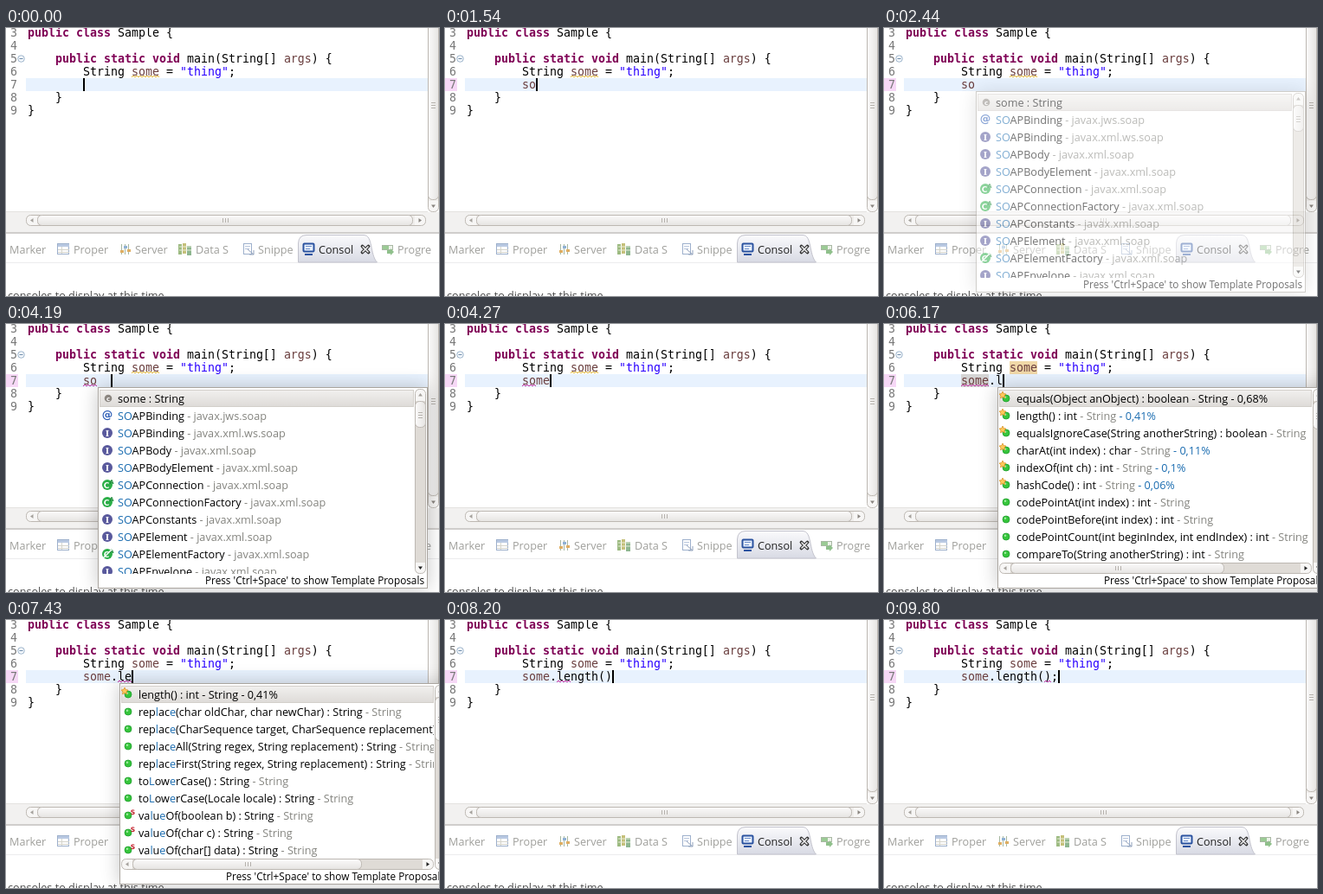
Recreate the animation shown at these times as an HTML page. Size 500 by 310 pixels, loop 9.9 s.

```html
<!DOCTYPE html>
<html lang="en">
<head>
<meta charset="utf-8">
<title>Code completion</title>
<style>
html, body { margin: 0; width: 100%; height: 100%; overflow: hidden; background: #fff; }
svg { display: block; }
#stage { position: absolute; left: 0; top: 0; }
text { white-space: pre; }
.code { font: 13.29px "DejaVu Sans Mono", monospace; fill: #000; }
.ui { font: 12.65px "Open Sans", "Noto Sans", sans-serif; fill: #000; }
.hint { font-size: 11.77px; }
.key { font-weight: bold; fill: #7f0055; }
.var { fill: #6a3e3e; }
.str { fill: #2a00ff; }
.num { fill: #787878; }
.hit { fill: #1a6cb0; }
.dim { fill: #84847f; }
.pick tspan { fill: #000; }
.tab { fill: #9f9f9b; }
.shade { filter: blur(11px); opacity: .22; }
</style>
</head>
<body>
<svg id="stage" width="500" height="310" viewBox="0 0 500 310"></svg>
<script>
const LOOP = 9900, CELL = 8, LEFT = 89;

const rect = (x, y, w, h, fill, more = '') =>
  `<rect x="${x}" y="${y}" width="${w}" height="${h}" fill="${fill}" ${more}/>`;
const path = (d, stroke, more = '') =>
  `<path d="${d}" fill="none" stroke="${stroke}" ${more}/>`;
const dot = (x, y, r, fill, more = '') =>
  `<circle cx="${x}" cy="${y}" r="${r}" fill="${fill}" ${more}/>`;
const text = (x, y, s, cls, more = '') =>
  `<text x="${x}" y="${y}" class="${cls}" ${more}>${s}</text>`;
const span = (cls, s) => `<tspan class="${cls}">${s}</tspan>`;
const group = (id, s, more = '') => `<g id="${id}" ${more}>${s}</g>`;
const clip = (x, y, w, h, s) =>
  `<svg x="${x}" y="${y}" width="${w}" height="${h}" viewBox="${x} ${y} ${w} ${h}">${s}</svg>`;
const gradient = (id, a, b, across = 0) =>
  `<linearGradient id="${id}" x2="${across}" y2="${1 - across}">
   <stop stop-color="${a}"/><stop offset="1" stop-color="${b}"/></linearGradient>`;

function squiggle(x, end, y, color) {
  let d = `M${x} ${y}`;
  for (let i = 1; x + 2 * i <= end; i++) d += `l2 ${i % 2 ? -2 : 2}`;
  return path(d, color);
}

// Scrollbar with arrow buttons; the thumb covers from..to along its axis.
function bar(x, y, w, h, from, to, trough = '#efedeb', ink = '#8a8580') {
  const tall = h > w, edge = 'stroke="#bdb8b2" rx="5"';
  const cx = x + w / 2, cy = y + h / 2, mid = Math.round((from + to) / 2);
  const size = tall ? h : w;
  const arrow = (along, turn, fill) => {
    const [px, py] = tall ? [cx, y + along] : [x + along, cy];
    return `<path d="M-2.5 -1.5h5L0 2z" fill="${fill}" transform="translate(${px} ${py}) rotate(${turn})"/>`;
  };
  let s = rect(x + .5, y + .5, w - 1, h - 1, '#f7f6f5', edge);
  s += tall ? rect(x + 1, from, w - 2, size - 13 - from + y, trough)
    : rect(from, y + 1, size - 13 - from + x, h - 2, trough);
  s += tall ? rect(x + .5, from + .5, w - 1, to - from - 1, 'url(#across)', edge)
    : rect(from + .5, y + .5, to - from - 1, h - 1, 'url(#down)', edge);
  s += arrow(7, tall ? 180 : 90, '#a5a19c') + arrow(size - 7, tall ? 0 : -90, ink);
  for (const k of [-3, 0, 3])
    s += tall ? rect(cx - 2.5, mid + k, 5, 1, '#b5b1ac') : rect(mid + k, cy - 2.5, 1, 5, '#b5b1ac');
  return s;
}
const popBar = (...box) => bar(...box, '#dfdbd6', '#222');

const letter = (x, y, s, size, fill, face = 'DejaVu Sans, sans-serif') =>
  `<text x="${x}" y="${y}" font-family="${face}" font-weight="bold" font-size="${size}" text-anchor="middle" fill="${fill}">${s}</text>`;
const green = (x, y) => dot(x, y, 4, '#35c53b', 'stroke="#1f9d2c" stroke-width=".8"') +
  dot(x - 1, y - 1.3, 1.3, '#9bea9c');
const icons = {
  l: (x, y) => dot(x, y, 4.3, '#8b8680') + letter(x, y + 2.5, 'c', 7, '#fff'),
  a: (x, y) => letter(x - 1, y + 3, '@', 12.5, '#2a5bb5'),
  i: (x, y) => dot(x - 1, y, 6, '#59599c') + letter(x - 1, y + 3.5, 'I', 9.5, '#fff', 'DejaVu Serif, serif'),
  c: (x, y) => dot(x - 1, y, 6, '#2bae47') + letter(x - 2, y + 3.5, 'C', 9, '#fff') +
    letter(x + 4, y - 1, 'A', 6.5, '#1d8a3a'),
  d: (x, y) => icons.c(x, y) + path(`M${x - 6} ${y + 5}L${x + 5} ${y - 6}`, '#fff', 'stroke-width="1.4"'),
  m: green,
  s: (x, y) => green(x, y) +
    `<path d="M${x - 4} ${y - 8}l1.2 2.6 2.8.4-2 2 .5 2.8-2.5-1.4-2.5 1.4.5-2.8-2-2 2.8-.4z" fill="#ffc95c" stroke="#d28a1c" stroke-width=".7"/>`,
  v: (x, y) => green(x, y) + letter(x + 5.5, y - 1, 'S', 7.5, '#c3202c'),
};

// Row syntax: icon key, then label with *match* and ~secondary parts.
function row(src, i, x, iconX) {
  const cy = 86 + 20 * i;
  const label = src.slice(1).split(/(\*[^*]*\*|~[^*]*)/).map(p =>
    p[0] === '*' ? span('hit', p.slice(1, -1)) : p[0] === '~' ? span('dim', p.slice(1)) : p).join('');
  return icons[src[0]](iconX, cy) + text(x, cy + 5, label, i ? 'ui' : 'ui pick');
}
function list(x, w, textX, iconX, rows) {
  return clip(x, 75, w, 214, rect(x, 75, w, 214, '#fff') +
    rect(x + .5, 76.5, w - 1, 19, 'url(#pick)', 'stroke="#d3cfca"') +
    rows.map((r, i) => row(r, i, textX, iconX)).join(''));
}
function frame(x, w) {
  return rect(x, 73, w, 233, '#000', 'class="shade"') +
    rect(x + .5, 73.5, w - 1, 232, '#fff', 'stroke="#aaa59f"');
}
const hint = x => text(x, 301, "Press 'Ctrl+Space' to show Template Proposals", 'ui hint');

const soap = (icon, name, pkg = 'xml') => `${icon}*SO*AP${name}~ - javax.${pkg}.soap`;
const types = ['lsome : String', soap('a', 'Binding', 'jws'), soap('i', 'Binding', 'xml.ws'),
  soap('i', 'Body'), soap('i', 'BodyElement'), soap('c', 'Connection'),
  soap('c', 'ConnectionFactory'), soap('i', 'Constants'), soap('i', 'Element'),
  soap('d', 'ElementFactory'), soap('i', 'Envelope')];

const from = (sig, pct) => sig + '~ - String' + (pct ? `* - ${pct}%*` : '');
const swaps = [
  from('mrep*l*ac*e*(char oldChar, char newChar) : String'),
  from('mrep*l*ac*e*(CharSequence target, CharSequence replacement) : String'),
  from('mrep*l*ac*e*All(String regex, String replacement) : String'),
  from('mrep*l*ac*e*First(String regex, String replacement) : String')];
const members = [
  [from('sequals(Object anObject) : boolean', '0,68'), from('slength() : int', '0,41'),
    from('sequalsIgnoreCase(String anotherString) : boolean'),
    from('scharAt(int index) : char', '0,11'), from('sindexOf(int ch) : int', '0,1'),
    from('shashCode() : int', '0,06'), from('mcodePointAt(int index) : int'),
    from('mcodePointBefore(int index) : int'),
    from('mcodePointCount(int beginIndex, int endIndex) : int'),
    from('mcompareTo(String anotherString) : int')],
  [from('slength() : int', '0,41'), from('sequa*l*s(Object anObject) : boolean', '0,68'),
    from('sequa*l*sIgnoreCase(String anotherString) : boolean'),
    from('m*l*astIndexOf(int ch) : int'), from('m*l*astIndexOf(int ch, int fromIndex) : int'),
    from('m*l*astIndexOf(String str) : int'), ...swaps],
  [from('slength() : int', '0,41'), ...swaps, from('mto*L*ow*e*rCase() : String'),
    from('mto*L*ow*e*rCase(Locale locale) : String'), from('vva*l*u*e*Of(boolean b) : String'),
    from('vva*l*u*e*Of(char c) : String'), from('vva*l*u*e*Of(char[] data) : String')]];

function memberList(n) {
  return list(133, 361, 153, 141, members[n]) +
    popBar(133, 276, 361, 13, 146, n ? 411 : 393) + popBar(495, 75, 13, 214, 89, n ? 140 : 122);
}

function codeLines() {
  const key = s => span('key', s), v = s => span('var', s);
  const lines = [key('public class') + ' Sample {', '',
    '    ' + key('public static void') + ` main(String[] ${v('args')}) {`,
    `        String ${v('some')} = ${span('str', '"thing"')};`, '', '    }', '}'];
  return lines.map((s, i) => text(5, 10 + 15 * i, i + 3, 'code num') + text(25, 10 + 15 * i, s, 'code')).join('');
}

function tabs() {
  const ink = '#9db0cc';
  const names = [[4, 'Marker'], [78, 'Proper'], [149, 'Server'], [219, 'Data S'], [291, 'Snippe'], [452, 'Progre']];
  let s = names.map(([x, n]) => text(x, 261, n, 'ui tab')).join('');
  s += rect(59.5, 249.5, 13, 12, '#fff', `stroke="${ink}"`) + rect(60, 250, 13, 3, '#b9c9e2') +
    path('M64.5 253v8M60 256.5h13M60 259.5h13', '#d5d4cc');
  s += path('M133.5 250v12M137.5 250v12M141.5 250v12', '#a7b7a0') +
    rect(132, 257, 4, 3, '#dfae62') + rect(136, 252, 4, 3, '#8fb1d4') + rect(140, 256, 4, 3, '#dfae62');
  s += rect(199, 250, 4, 12, '#9dbb82') + rect(204, 249, 4, 12, '#c5c07a') +
    rect(209, 252, 5, 11, '#8eb690') + path('M200 253h14M200 257h14', '#e9edd8');
  s += rect(274.5, 249.5, 9, 12, '#fff', `stroke="${ink}"`) +
    path('M276 252.5h6M276 255.5h5', '#b7c5dc') + path('M279 256l7 6M286 257v5h-5', '#8f9fba');
  s += `<path d="M337.5 271V249Q338 239.5 347 239.5H413C424 239.5 420 262 428.5 271Z" fill="url(#tab)" stroke="#c3c3cd"/>`;
  s += rect(343.5, 249.5, 12, 9, '#eaf2ff', 'stroke="#2b53a0" stroke-width="2" rx="1"') +
    path('M346 252.5h7M346 255.5h5', '#6f8fc8') + rect(345, 261, 9, 2, '#2b53a0');
  s += text(361, 261, 'Consol', 'ui', 'style="fill:#222"');
  const cross = 'M411.5 252.5L418.5 259.5M418.5 252.5L411.5 259.5';
  s += path(cross, '#333', 'stroke-width="3.8" stroke-linecap="round"') +
    path(cross, '#f4f4f6', 'stroke-width="1.5"');
  s += rect(434.5, 251.5, 12, 5, '#eef3ea', 'stroke="#a9b8a4"') + rect(435, 252, 7, 4, '#9bcb95') +
    `<path d="M440 257h4v-2l4 4-4 4v-2h-4z" fill="#8fc08b"/>`;
  return s;
}

const stage = document.getElementById('stage');
stage.innerHTML = '<defs>' + gradient('across', '#fbfafa', '#e6e4e2', 1) + gradient('down', '#fbfafa', '#e6e4e2') +
  gradient('pick', '#f1f0ee', '#dedbd8') + gradient('tab', '#fafafc', '#d8dae4') + '</defs>' +
  rect(0, 0, 500, 310, '#fff') +
  rect(23, 58, 464, 15, '#e8f2fe') +
  group('diff', rect(0, 58, 14, 15, '#f6d8f6')) +
  group('marks', rect(145, 43, 32, 15, '#f0d8a8') + rect(89, 58, 32, 15, '#d4d4d4')) +
  codeLines() + group('warn', squiggle(145, 177, 57, '#dfb53a')) +
  dot(17.5, 35.5, 3.8, '#f4f8fc', 'stroke="#9db4cb"') + path('M15.5 35.5h4', '#6f8cab') +
  text(LEFT, 70, '', 'code', 'id="typed"') + group('error', '') + rect(0, 58, 2, 15, '#000', 'id="caret"') +
  rect(0, 213, 500, 24, '#f2f1f0') + rect(0, 212, 487, 1, '#e4e2e0') +
  bar(487, -40, 13, 253, -22, 199) + bar(23, 216, 462, 13, 36, 470) +
  rect(0, 236, 500, 2, '#d0cecc') + rect(0, 271, 500, 1, '#ececee') + tabs() +
  text(2, 314, 'consoles to display at this time.', 'ui', 'style="fill:#4c4c4c"') +
  group('doc', rect(501, 91, 120, 179, '#000', 'class="shade"')) +
  group('popA', frame(106, 381) + list(108, 363, 129, 118, types) + popBar(472, 75, 13, 214, 89, 120) + hint(230)) +
  group('popB', frame(131, 440) + members.map((m, n) => group('list' + n, memberList(n))).join('') + hint(254));

// Each step changes part of the state; caret is a column, or -1 when hidden.
const steps = [
  [0, { code: '', caret: 0, err: null, warn: 1, marks: 0, diff: 0, popA: 0, popB: 0, doc: 0, list: 0 }],
  [100, { caret: -1 }], [700, { caret: 0 }],
  [1230, { code: 's', caret: 1, diff: 1 }],
  [1540, { code: 'so', caret: 2 }],
  [2100, { caret: -1 }],
  [2440, { popA: .54 }], [2480, { popA: 1, err: [0, 2] }],
  [3070, { caret: 2 }], [3690, { caret: -1 }],
  [4190, { caret: 4 }],
  [4230, { code: 'some', popA: .5 }], [4270, { popA: 0 }],
  [4780, { caret: -1 }],
  [4980, { caret: 4, marks: 1, warn: 0, err: [0, 4] }],
  [5540, { caret: -1 }],
  [5680, { code: 'some.', caret: 5 }],
  [5720, { popB: .02 }], [5760, { popB: .55 }], [5800, { popB: 1 }],
  [6170, { code: 'some.l', caret: 6 }], [6210, { list: 1 }],
  [6520, { code: 'some.le', caret: 7, list: 2 }],
  [6720, { doc: .5 }], [6760, { doc: 1 }],
  [7060, { caret: -1 }],
  [7430, { caret: 7, marks: 0, err: [5, 7] }],
  [7990, { caret: -1 }],
  [8120, { caret: 13 }],
  [8160, { code: 'some.length()', popB: .5, doc: .5 }], [8200, { popB: 0, doc: 0 }],
  [8720, { caret: -1 }],
  [8900, { code: 'some.length();', caret: 14 }], [8980, { err: [12, 13] }],
  [9530, { caret: -1 }], [9800, { caret: 14 }],
];

const $ = id => document.getElementById(id);
let shown = 0;

function draw(t) {
  const past = steps.filter(s => s[0] <= t);
  if (past.length === shown) return;
  shown = past.length;
  const st = Object.assign({}, ...past.map(s => s[1]));
  $('typed').innerHTML = span('var', st.code.slice(0, 4)) + st.code.slice(4);
  $('caret').setAttribute('x', LEFT + CELL * st.caret);
  $('caret').style.opacity = st.caret < 0 ? 0 : 1;
  $('error').innerHTML = st.err ? squiggle(LEFT + CELL * st.err[0], LEFT + CELL * st.err[1], 72, '#c030a0') : '';
  for (const id of ['warn', 'marks', 'diff', 'popA', 'popB', 'doc']) $(id).style.opacity = st[id];
  members.forEach((m, n) => $('list' + n).style.display = n === st.list ? '' : 'none');
}

const start = performance.now();
function tick() {
  draw((performance.now() - start) % LOOP);
  requestAnimationFrame(tick);
}
tick();
</script>
</body>
</html>
```
